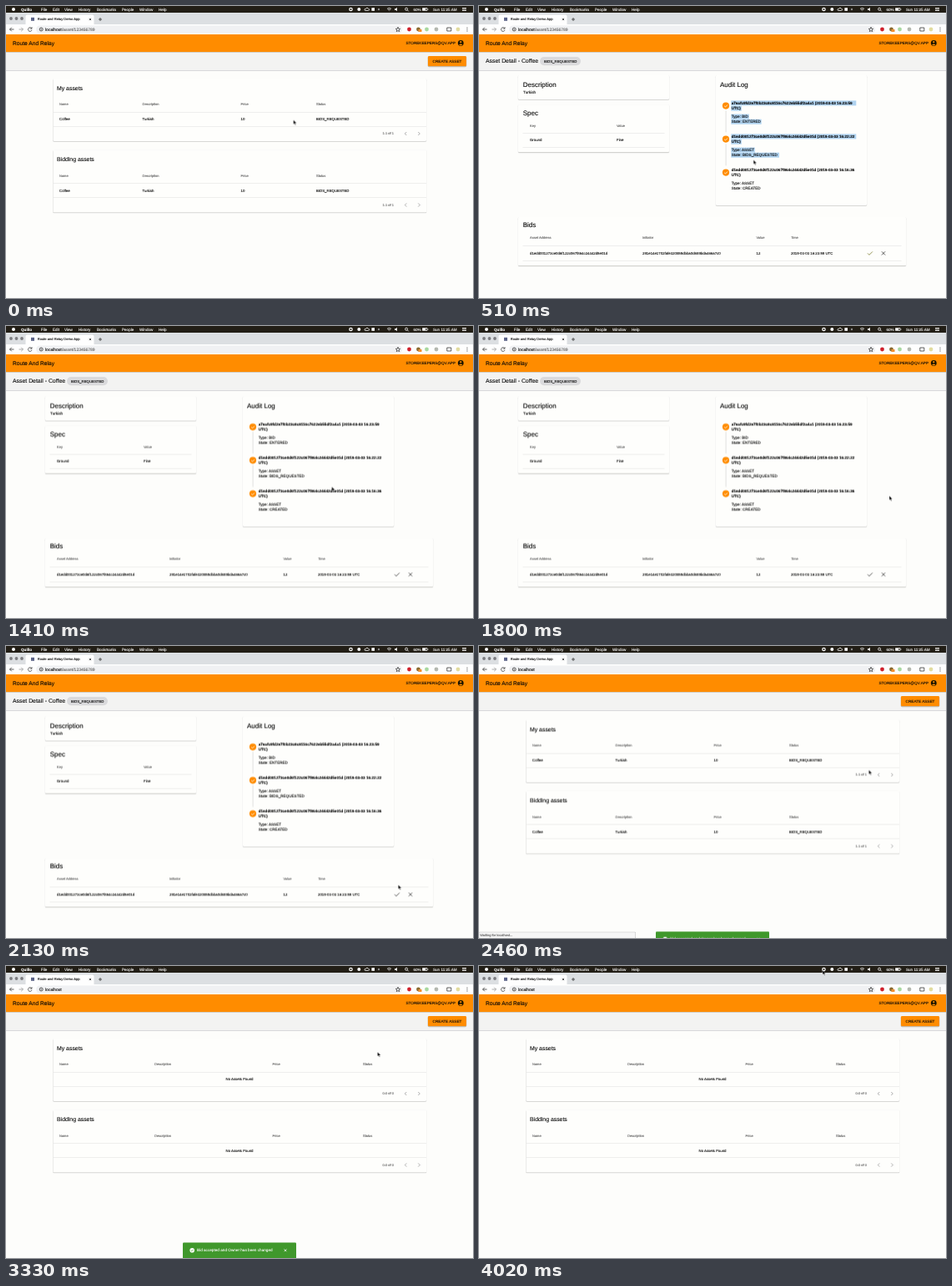
These frames come from a looping animation (560x350 px, 4.05 s). An HTML page:

```html
<!DOCTYPE html>
<html lang="en">
<head>
<meta charset="utf-8">
<title>Asset demo</title>
<style>
  html, body { margin: 0; width: 100%; height: 100%; overflow: hidden; background: #fdfdfb; }
  svg { display: block; width: 560px; height: 350px; }
  text {
    font-family: "Liberation Sans", Arial, sans-serif; white-space: pre;
    text-rendering: geometricPrecision;
    color: #080808; fill: currentColor; stroke: currentColor; stroke-width: .1;
  }
  .bold { font-weight: 700; }
  .head { color: #5c5c5c; }
  .light { color: #fff; }
  .line { fill: none; stroke: #383838; stroke-width: .8; }
  .faint { stroke: #999; }
  .white { stroke: #fff; }
</style>
</head>
<body>
<svg id="stage" viewBox="0 0 560 350" xmlns="http://www.w3.org/2000/svg"></svg>
<script>
const LOOP = 4050;
const PAGE = '#fdfdfb', ORANGE = '#ff8c00', DARK = '#221e16', GREEN = '#40982c';
const css = [];

// Looping keyframes from [ms, declarations] stops
function keys(name, stops, easing = 'step-end') {
  const body = stops.map(([ms, rule]) => `${(ms / LOOP * 100).toFixed(3)}%{${rule}}`).join('');
  css.push(`@keyframes ${name}{${body}} .${name}{animation:${name} ${LOOP}ms ${easing} infinite}`);
}

// Visible only inside the given [from, to] spans
function during(name, ...spans) {
  const stops = spans[0][0] > 0 ? [[0, 'opacity:0']] : [];
  for (const [from, to] of spans) {
    stops.push([from, 'opacity:1']);
    if (to < LOOP) stops.push([to, 'opacity:0']);
  }
  const last = stops[stops.length - 1][1];
  keys(name, [...stops, [LOOP, last]]);
}

const text = (x, mid, str, size = 4.33, cls = '', anchor = 'start') =>
  `<text x="${x}" y="${mid + size * .36}" font-size="${size}" class="${cls}" text-anchor="${anchor}">${str}</text>`;
const rect = (x, y, w, h, fill, r = 0) =>
  `<rect x="${x}" y="${y}" width="${w}" height="${h}" rx="${r}" fill="${fill}"/>`;
const dot = (x, y, r, fill) => `<circle cx="${x}" cy="${y}" r="${r}" fill="${fill}"/>`;
const path = (d, cls = '') => `<path d="${d}" class="line ${cls}"/>`;
const group = (cls, ...parts) => `<g class="${cls}">${parts.join('')}</g>`;
const rule = (x, y, w) => rect(x, y, w, .5, '#dcdcdc');
const row = (xs, mid, words, size, cls) =>
  words.map((word, i) => text(xs[i], mid, word, size, cls)).join('');
const cross = (x, y, r, cls) =>
  path(`M${x - r} ${y - r}l${2 * r} ${2 * r}m0 ${-2 * r}l${-2 * r} ${2 * r}`, cls);
const tick = (x, y, s, cls) =>
  path(`M${x - s} ${y}l${s * .7} ${s * .7} ${s * 1.4} ${-s * 1.4}`, cls);
const card = (x, y, w, h) =>
  rect(x - .4, y + .2, w + .8, h + .9, '#ececec', 1.3) +
  rect(x, y + 1, w, h - .4, '#c4c4c0', 1.3) + rect(x, y, w, h, '#fefefc', 1.3);

function menuBar() {
  const menus = [[42, 'File'], [56, 'Edit'], [70, 'View'], [87, 'History'],
    [109, 'Bookmarks'], [139, 'People'], [160, 'Window'], [183, 'Help']];
  return rect(0, 0, 560, 8, DARK) + dot(9, 4, 2, '#fff') +
    text(18, 4, 'Quillo', 4.6, 'light bold') +
    menus.map(([x, word]) => text(x, 4, word, 4.6, 'light')).join('') +
    dot(413.5, 4, 2.3, '#fff') + rect(412.6, 3.1, 1.8, 1.8, DARK) +
    dot(423.3, 4, 2, '#fff') +
    path('M430.6 5.4h4a1 1 0 0 0 0-2 1.7 1.7 0 0 0-3.2 0 1 1 0 0 0-.8 2z', 'white') +
    rect(438.4, 2.2, 3.6, 3.6, '#fff') + dot(447, 4, 1.2, '#8c8c8c') +
    path('M457 3.4q2.5-2 5 0M458.2 4.7q1.3-1 2.6 0M459.4 6h.3', 'white') +
    '<path d="M466 3.2h1.3l1.6-1.4v4.4l-1.6-1.4H466z" fill="#fff"/>' +
    path('M481.3 4.9l1.5 1.5M481.6 3.7a1.5 1.5 0 1 1-3 0a1.5 1.5 0 1 1 3 0', 'white') +
    text(488.5, 4, '60%', 4.6, 'light') +
    path('M499.5 2.6h5.5v2.8h-5.5zM506 3.5v1', 'white') + rect(500, 3, 3.2, 2, '#fff') +
    text(512, 4, 'Sun 11:25 AM', 4.6, 'light') +
    path('M547 2.5h5M547 4h5M547 5.5h5', 'white');
}

function browser() {
  const badges = [[483.5, '#d0202c'], [494.5, '#8a6a30'], [504.5, '#a8d8a0'],
    [516, '#b4b8b0'], [542, '#e2dca0']];
  return rect(0, 8, 560, 14, '#dcdfe2') +
    [6, 12.5, 19].map(x => dot(x, 15, 1.9, '#7c7c80')).join('') +
    rect(23.5, 10.5, 82, 13, '#fefefe', 2) + rect(30, 13.8, 4, 4, '#5c6488') +
    text(37.7, 16, 'Route and Relay Demo App', 4.1) + cross(101, 16, 1.1) +
    path('M111 16h4M113 14v4') +
    rect(0, 22, 560, 12, '#fefefe') + rect(36, 23.5, 439, 9, '#f0f1f3', 4.5) +
    path('M9.5 28h-5M6.8 25.7L4.5 28l2.3 2.3') +
    path('M15.5 28h5M18.2 25.7l2.3 2.3-2.3 2.3', 'faint') +
    path('M30.6 26.7a2.3 2.3 0 1 0 .4 2M31 25.3v1.8h-1.8') +
    path('M44.2 28a2 2 0 1 1-4 0a2 2 0 1 1 4 0M42.2 27.6v1.4M42.2 26.7v.3') +
    text(47, 28, 'localhost', 5) +
    group('path', text(66.9, 28, '/asset/123456789', 5, 'head')) +
    path('M470 25.4l.8 1.8 1.9.2-1.4 1.3.4 1.9-1.7-1-1.7 1 .4-1.9-1.4-1.3 1.9-.2z') +
    badges.map(([x, fill]) => dot(x, 28, 2.4, fill)).join('') +
    rect(494.5, 28, 4, 3, '#f09030', .5) +
    path('M528.8 26h5v4h-5z') +
    [26, 28, 30].map(y => dot(553, y, .6, '#383838')).join('');
}

function appBars() {
  return rect(0, 55, 560, 22, '#f3f3f2') + rect(0, 77, 560, .8, '#cfcfd2') +
    rect(0, 34, 560, 21, ORANGE) + rect(0, 55, 560, .6, '#c0b8ac') +
    text(8, 44.5, 'Route And Relay', 6.67) +
    text(539, 44.5, 'STOREKEEPERS@QV.APP', 4.67, '', 'end') +
    dot(545.3, 44.5, 3.4, '#1c1400') + dot(545.3, 43.2, 1.1, ORANGE) +
    `<path d="M543.2 46.6q2.1-2 4.2 0q-2.1 1.8-4.2 0z" fill="${ORANGE}"/>`;
}

function assetCard(top, title, filled) {
  const xs = filled ? [64, 163.5, 281.5, 372] : [64, 178, 319.5, 428];
  const cells = filled
    ? row(xs, top + 48.5, ['Coffee', 'Turkish', '10', 'BIDS_REQUESTED'])
    : text(280, top + 48.5, 'No Assets Found', 4.33, '', 'middle');
  return card(56.5, top, 447.5, 75) + text(61, top + 11.3, title, 6.9) +
    row(xs, top + 31, ['Name', 'Description', 'Price', 'Status'], 4, 'head') +
    rule(56.5, top + 40, 447.5) + cells + rule(56.5, top + 57, 447.5) +
    text(465, top + 66, filled ? '1-1 of 1' : '0-0 of 0', 4, 'head', 'end') +
    path(`M480.3 ${top + 64}l-2 2 2 2M494.3 ${top + 64}l2 2-2 2`, 'faint');
}

const assets = filled =>
  assetCard(87, 'My assets', filled) + assetCard(172.5, 'Bidding assets', filled);

const ASSET_ID = 'd1edd001273ce0d6f122c067f864c24442d5e01d';
const BID_ID = 'a7eafc9fd2e7f0b23c8c8116c7622eb55df2a4a1';
const LOG = [
  [BID_ID, '16:23:59', 'BID', 'ENTERED'],
  [ASSET_ID, '16:22:22', 'ASSET', 'BIDS_REQUESTED'],
  [ASSET_ID, '16:16:36', 'ASSET', 'CREATED'],
];

function logEntry([id, time, type, state], i) {
  const y = 116.4 + i * 40;
  const lines = [
    [0, `${id} (2019-03-03 ${time}`, 'bold', 150],
    [6.3, 'UTC)', 'bold', 12.5],
    [16.2, `Type: ${type}`, '', type === 'BID' ? 21.5 : 28.5],
    [22.3, `State: ${state}`, '', 15 + state.length * 3.05],
  ];
  const marks = lines.map(([dy, , , w], j) => {
    const name = `mark${i}${j}`;
    during(name, [360 + (i * 4 + j) * 20, 1080]);
    return group(name, rect(302.3, y + dy - 3, w, 6, '#b0d3f0'));
  });
  return (i < 2 ? rect(295.8, y + 9, .5, 26, '#c4c4c4') : '') +
    dot(296, y + 3.2, 4.1, ORANGE) + tick(296, y + 3.4, 1.8, 'white') + marks.join('') +
    lines.map(([dy, str, cls]) => text(302.7, y + dy, str, 4.6, cls)).join('');
}

function detail() {
  const spec = [61, 165], bid = [61, 196, 332.5, 374];
  const title = (x, mid, str) => text(x, mid, str, 8);
  return card(47, 83, 181, 29) + title(52.7, 94.3, 'Description') + text(53, 103, 'Turkish', 4.67) +
    card(47, 118.3, 181, 57) + title(52.7, 128.4, 'Spec') +
    row(spec, 143.3, ['Key', 'Value'], 4, 'head') + rule(52.5, 152, 170) +
    row(spec, 160.7, ['Ground', 'Fine']) + rule(52.5, 169.4, 170) +
    card(284, 83, 181, 156) + title(289, 94.3, 'Audit Log') + LOG.map(logEntry).join('') +
    card(47, 253, 465, 58.3) + title(52.7, 262.5, 'Bids') +
    row(bid, 277.3, ['Asset Address', 'Initiator', 'Value', 'Time'], 4, 'head') +
    rule(52.5, 287, 454) +
    row(bid, 296.3, [ASSET_ID, '291e14e1702fafe320855dbba0d689bda466a7c0', '12', '2019-03-03 16:23:59 UTC']) +
    rule(52.5, 305, 454) +
    tick(468.8, 296.4, 2.8, 'accept') + cross(485, 296.4, 2.1);
}

const detailBar = text(8, 66, 'Asset Detail - Coffee', 6.9) +
  rect(73, 61, 49, 10.2, '#dadadc', 5.1) + text(78, 66.1, 'BIDS_REQUESTED');
const listBar = rect(505.7, 60.6, 46.6, 12.6, '#c4b8a4', 1.6) +
  rect(506, 60, 46, 12, ORANGE, 1.3) + text(529, 66.1, 'CREATE ASSET', 4.67, '', 'middle');

const snackbar = rect(212, 331.5, 136, 22, GREEN, 1.3) +
  dot(223.2, 340.7, 2.8, '#fff') +
  `<path d="M221.8 340.8l1 1 1.9-2" fill="none" stroke="${GREEN}" stroke-width=".7"/>` +
  text(229, 340.8, 'Bid accepted and Owner has been changed', 4.67, 'light') +
  cross(335, 340.8, 1.4, 'white');
const status = rect(0, 342.7, 188, 8, '#c4c4c4', 1) + rect(0, 343.2, 187.4, 7, '#f6f6f6', 1) +
  text(1.2, 346.6, 'Waiting for localhost...', 4, 'head');

const pointer = '<path d="M0 0v5.3l1.2-1.1.9 2 .9-.4-.9-1.9h1.7z" fill="#000" stroke="#fff" stroke-width=".4"/>';

const OPEN = 90, BACK = 2400, EMPTY = 2760;
during('path', [0, BACK]);
during('list', [0, OPEN], [BACK, LOOP]);
during('detail', [OPEN, BACK]);
during('filled', [0, OPEN], [BACK, EMPTY]);
during('empty', [EMPTY, LOOP]);
during('status', [2430, 2700]);
keys('accept', [[0, 'stroke:#7c7c2c'], [1080, 'stroke:#383838'], [LOOP, 'stroke:#383838']]);

// Content drops slightly during each refresh
const moved = y => `transform:translateY(${y}px)`;
keys('refresh', [[0, moved(0)],
  ...[600, 1050, 1410, 1770, 2130, 2430].flatMap(ms => [[ms, moved(1.4)], [ms + 90, moved(0)]]),
  [LOOP, moved(0)]]);
keys('snack', [[0, moved(22)], [2415, moved(22)], [2460, moved(11)], [2490, moved(0)],
  [3570, moved(0)], [3630, moved(22)], [LOOP, moved(22)]], 'linear');

const trail = [[0, 344.6, 136.5], [120, 344.6, 136.5], [330, 303, 114], [600, 342, 219],
  [840, 244, 183.3], [1080, 244, 183.3], [1500, 430, 195], [1770, 492, 203.5],
  [1860, 492, 203.5], [2160, 468, 295], [2280, 468, 295], [2460, 467.5, 148.5],
  [2760, 445, 143.5], [3060, 445, 143.5], [3300, 445.5, 103], [3570, 445.5, 103],
  [3930, 412, 5], [LOOP, 412, 5]];
keys('pointer', trail.map(([ms, x, y]) => [ms, `transform:translate(${x}px,${y}px)`]), 'linear');

document.getElementById('stage').innerHTML =
  rect(0, 0, 560, 350, PAGE) + menuBar() + browser() + appBars() +
  group('list', listBar) + group('detail', detailBar) +
  group('refresh',
    group('filled', assets(true)), group('empty', assets(false)), group('detail', detail())) +
  group('status', status) + group('snack', snackbar) + group('pointer', pointer);

const sheet = document.createElement('style');
sheet.textContent = css.join('\n');
document.head.append(sheet);
</script>
</body>
</html>
```
